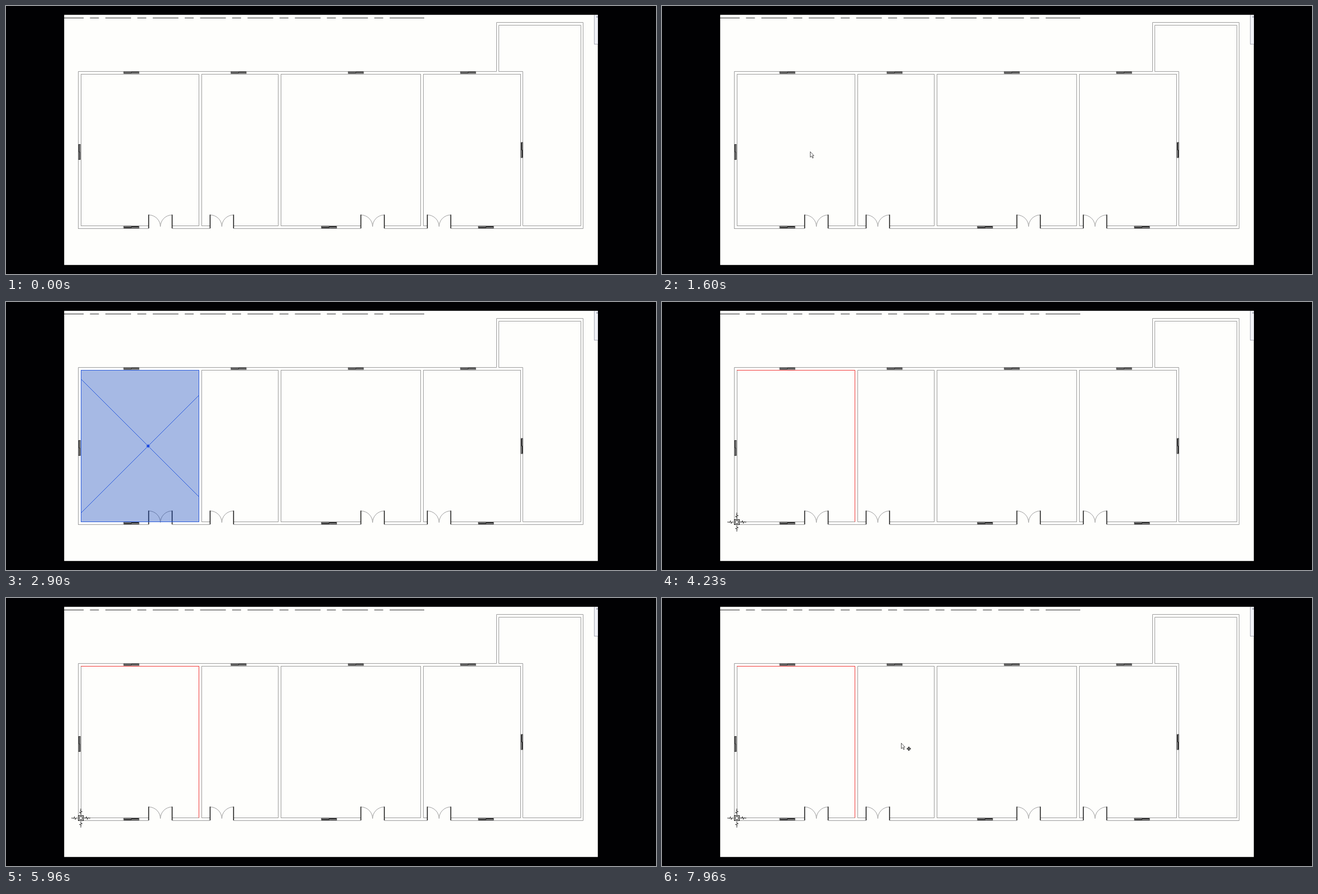
An HTML page with a canvas for the animation above (8 s loop, 1164 by 481 pixels).

```html
<!DOCTYPE html>
<html lang="en">
<head>
<meta charset="utf-8">
<title>Floor plan</title>
<style>
html, body { margin: 0; width: 100%; height: 100%; overflow: hidden; background: #010103; }
canvas { display: block; }
</style>
</head>
<body>
<canvas id="stage" width="1164" height="481"></canvas>
<script>
const ctx = document.getElementById('stage').getContext('2d');
const LOOP = 8000, PAPER = '#fefefc', WALL = '#9c9c9c', INK = '#2a2a2a', BLUE = '#2a5bdc';
const TOP = 122.5, BOTTOM = 394.5, MIDDLE = 258.5, REACH = 120;

// Rooms sit between neighbouring walls; a cross marks each space
const walls = [134.5, 350.5, 492.5, 747.5, 926.5];
const rooms = walls.slice(0, -1).map((left, i) => ({
  left, right: walls[i + 1] - 5, centre: left + REACH, space: i !== 1
}));
const doors = [255.5, 365.5, 635.5, 754.5];
const windows = { 119.5: [224.5, 416.5, 626.5, 827.5], 397: [224.5, 578.5, 859.5] };

// The pointer enters, glides to (x, y) between two times, and rests in between
const trips = [
  { from: 500, to: 2900, plus: [2100, 2700], entry: [1033, 246], moves: [
    [500, 960, 437, 252], [960, 1160, 271, 262], [1360, 1900, 257, 260],
    [2100, 2200, 264, 261], [2200, 2400, 257, 259], [2700, 2900, 108, 255]] },
  { from: 4700, to: 5960, plus: [0, 0], entry: [104, 150], moves: [
    [4700, 4980, 492, 284], [4980, 5100, 468, 268], [5100, 5600, 123, 58], [5800, 5960, 104, 12]] },
  { from: 7400, to: LOOP, plus: [7700, LOOP], entry: [1030, 246], moves: [
    [7400, 7860, 387, 264], [7860, 7960, 428, 260]] }
];

function line(color, width, ...points) {
  ctx.strokeStyle = color;
  ctx.lineWidth = width;
  ctx.beginPath();
  for (let i = 0; i < points.length; i += 2) ctx.lineTo(points[i], points[i + 1]);
  ctx.stroke();
}

function box(x, y, w, h, fill, stroke) {
  if (fill) { ctx.fillStyle = fill; ctx.fillRect(x, y, w, h); }
  if (stroke) { ctx.strokeStyle = stroke; ctx.lineWidth = 1; ctx.strokeRect(x, y, w, h); }
}

function clipped(x, y, w, h, draw) {
  ctx.save();
  ctx.beginPath();
  ctx.rect(x, y, w, h);
  ctx.clip();
  draw();
  ctx.restore();
}

function at(x, y, draw, angle = 0) {
  ctx.save();
  ctx.translate(x, y);
  ctx.rotate(angle);
  draw();
  ctx.restore();
}

function plusSign(color, width, arm) {
  line(color, width, -arm, 0, arm, 0);
  line(color, width, 0, -arm, 0, arm);
}

function drawWindow() {
  box(-13.5, -1.5, 27, 3, '#b4b4b4', '#333');
  line('#111', 1, -13, .5, 0, .5, 0, -.5, 13, -.5);
}

function drawDoor(x) {
  box(x, 393, 42, 8, PAPER);
  for (const side of [1, -1]) {
    const hinge = side > 0 ? x : x + 42;
    ctx.strokeStyle = WALL;
    ctx.lineWidth = 1;
    ctx.beginPath();
    ctx.arc(hinge, 396, 21, -Math.PI / 2, side > 0 ? 0 : -Math.PI, side < 0);
    ctx.stroke();
    line('#111', 1.5, hinge, 374.5, hinge, 399);
  }
}

function drawGridLine() {
  ctx.setLineDash([46, 11.3, 16, 11.55]);
  ctx.lineDashOffset = 10.9;
  line(INK, 1, 104, 21.5, 734, 21.5);
  ctx.setLineDash([]);
  line(INK, 1, 733, 21.5, 749, 21.5);
}

function drawPlan() {
  box(0, 0, 1164, 481, '#010103');
  box(104.2, 15.8, 955.6, 449, PAPER);
  drawGridLine();
  clipped(1050, 16, 10, 60, () => {
    box(1053.5, 14.5, 12, 54, '#f0f1f6', '#a9abb8');
    box(1057, 18, 3, 3, '#b5b7c2');
  });

  line(WALL, 1, 129.5, 399.5, 129.5, 117.5, 878.5, 117.5, 878.5, 29.5,
    1033.5, 29.5, 1033.5, 399.5, 129, 399.5);
  line(WALL, 1, 882.5, 117.5, 882.5, 34.5, 1029.5, 34.5, 1029.5, BOTTOM,
    925.5, BOTTOM, 925.5, 117.5, 882, 117.5);
  for (const { left, right } of rooms) box(left, TOP, right - left, BOTTOM - TOP, null, WALL);
  doors.forEach(drawDoor);

  for (const y in windows) windows[y].forEach(x => at(x, +y, drawWindow));
  at(131.5, 262, drawWindow, Math.PI / 2);
  at(924, MIDDLE, drawWindow, Math.PI / 2);
}

function drawSpace({ left, right, centre }, filled) {
  const w = right - left, h = BOTTOM - TOP;
  clipped(left - .5, TOP - .5, w + 1, h + 1, () => {
    box(left, TOP, w, h, filled && 'rgba(0,55,183,.35)', BLUE);
    at(centre, MIDDLE, () => {
      line(BLUE, 1, -REACH, -REACH, REACH, REACH);
      line(BLUE, 1, -REACH, REACH, REACH, -REACH);
      plusSign('#0a3be0', 1.6, 3);
    });
  });
}

function drawResult() {
  line('#f23b3b', 1, 134, TOP, 345.5, TOP, 345.5, BOTTOM);
  for (let i = 0; i < 4; i++) {
    at(134, 395, () => line(INK, 1, 6, 0, 9, 0, 10, -2.5, 11.5, 2.5, 13, -1, 14, 0, 17, 0), i * Math.PI / 2);
  }
  box(129.5, 390.5, 9, 9, PAPER, '#000');
  box(131.5, 392.5, 5, 5, null, '#333');
}

function pointerAt(t) {
  const trip = trips.find(({ from, to }) => t >= from && t < to);
  if (!trip) return null;
  let [x, y] = trip.entry;
  for (const [start, end, toX, toY] of trip.moves) {
    const k = Math.min(1, Math.max(0, (t - start) / (end - start)));
    x += (toX - x) * k;
    y += (toY - y) * k;
  }
  const [on, off] = trip.plus;
  return { x: Math.round(x), y: Math.round(y), plus: t >= on && t < off };
}

// A space lights up when the pointer touches one of its diagonals
function touches({ left, right, centre, space }, { x, y }) {
  return space && x > left && x < right && y > TOP && y < BOTTOM &&
    Math.abs(Math.abs(x - centre) - Math.abs(y - MIDDLE)) < 4;
}

const arrow = new Path2D('M0 0V10L2.3 7.8L4 11.5L5.5 11L3.9 7.2H6.6Z');

function drawPointer({ x, y, plus }) {
  clipped(104, 16, 956, 449, () => at(x + .5, y + .5, () => {
    ctx.fillStyle = '#fff';
    ctx.strokeStyle = '#444';
    ctx.lineWidth = .9;
    ctx.fill(arrow);
    ctx.stroke(arrow);
    if (plus) at(13.5, 10, () => {
      plusSign(INK, 2.6, 3.5);
      plusSign('#999', .7, 2.5);
    });
  }));
}

function frame(now) {
  const t = now % LOOP;
  const pointer = pointerAt(t);
  drawPlan();
  if (t >= 4230) drawResult();
  if (t >= 2660 && t < 4230) drawSpace(rooms[0], true);
  else if (pointer) rooms.filter(room => touches(room, pointer)).forEach(room => drawSpace(room, false));
  if (pointer) drawPointer(pointer);
  requestAnimationFrame(frame);
}
requestAnimationFrame(frame);
</script>
</body>
</html>
```
